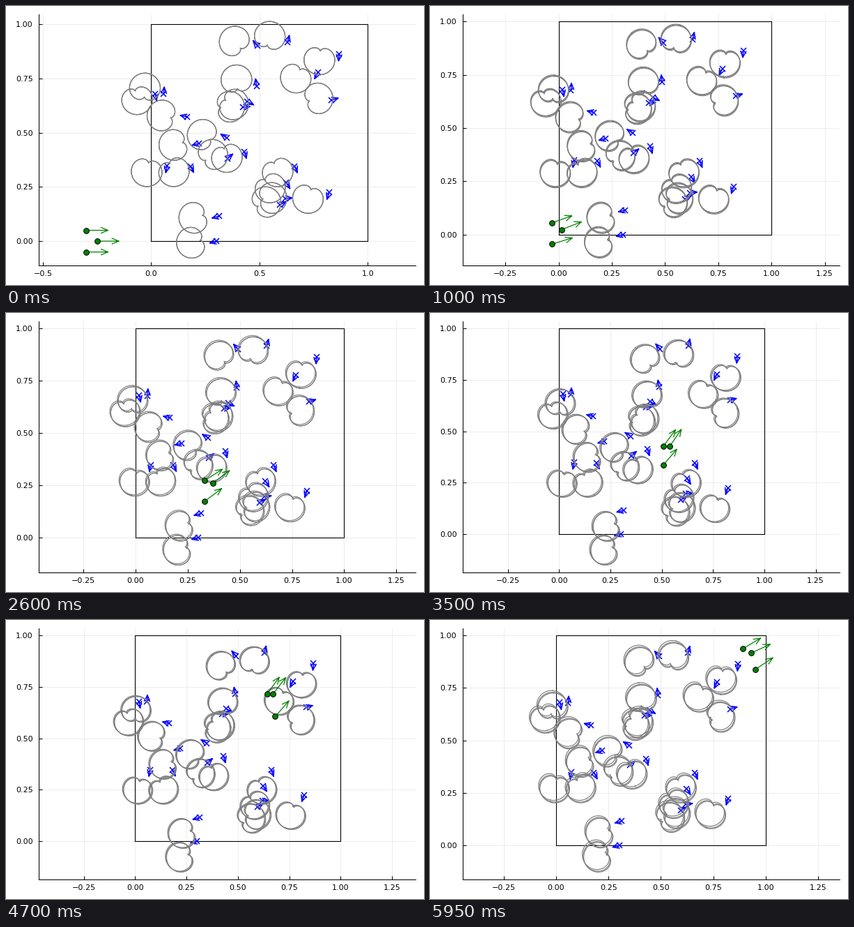
Recreate the animation shown at these times as a matplotlib script. Size 600 by 400 pixels, loop 6000 ms.

```python
import numpy as np
import matplotlib.pyplot as plt
from matplotlib.animation import FuncAnimation

FRAMES, INTERVAL = 120, 50
W, H = 600, 400
LEFT, RIGHT, TOP, BOTTOM = 46.5, 588, 12, 371.6
SPEED, STEP = 0.1, 0.01333     # arrow length, distance per frame
SIZE, BACK = 0.0547, 0.0125    # cardioid scale, cusp offset behind the obstacle
REACH = 0.89                   # how far the agent velocity shifts a cardioid

# obstacles in groups; headings fan evenly between two angles
FANS = {
    (-116, -95): [.769+.778j, .822+.224j, .074+.348j, .868+.864j],
    (-78, -58): [.018+.680j, .430+.413j, .662+.346j, .181+.346j, .623+.270j],
    (-28, 6): [.444+.644j, .423+.617j],
    (6, 39): [.618+.196j, .832+.650j, .594+.167j, .351+.381j],
    (75, 97): [.629+.917j, .058+.678j, .486+.716j],
    (131, 165): [.492+.900j, .349+.476j, .166+.572j],
    (195, 195): [.221+.451j, .313+.115j, .302],
}

# agent waypoints, all setting out to the right
KEYS = np.array([0, 20, 34, 70, 94, 119])
PATHS = np.array([
    [-.3+.05j, -.033+.055j, .126+.152j, .507+.426j, .642+.716j, .889+.936j],
    [-.25, .013+.023j, .172+.124j, .538+.426j, .671+.716j, .930+.916j],
    [-.3-.05j, -.032-.045j, .132+.042j, .508+.336j, .682+.606j, .950+.838j],
])
SLOPES = np.gradient(PATHS, KEYS, axis=1, edge_order=2)
SLOPES[:, 0] = 1
SLOPES *= STEP / abs(SLOPES)


def turn(deg):
    return np.exp(1j * np.radians(deg))


def xy(z):
    return z.real, z.imag


def agents(i):
    """Positions and velocities from a cubic Hermite through the waypoints."""
    k = min(np.searchsorted(KEYS, i, side="right") - 1, len(KEYS) - 2)
    span = KEYS[k + 1] - KEYS[k]
    u = (i - KEYS[k]) / span
    p, q = PATHS[:, k], PATHS[:, k + 1]
    m, n = SLOPES[:, k] * span, SLOPES[:, k + 1] * span
    pos = ((2*u**3 - 3*u**2 + 1) * p + (u**3 - 2*u**2 + u) * m
           + (3*u**2 - 2*u**3) * q + (u**3 - u**2) * n)
    d = (6*u**2 - 6*u) * (p - q) + (3*u**2 - 4*u + 1) * m + (3*u**2 - 2*u) * n
    return pos, SPEED * d / abs(d)


def broken(*columns):
    """One line with a gap after each row of points."""
    rows = np.column_stack(columns)
    return np.column_stack([rows, np.full(len(rows), np.nan)]).ravel()


def arrows(start, vec, length, half):
    tip, d = start + vec, vec / abs(vec)
    wing = -length * d
    side = 1j * half * d
    return np.concatenate([broken(start, tip),
                           broken(tip + wing + side, tip, tip + wing - side)])


SPOTS = np.concatenate(list(FANS.values()))
HEADS = turn(np.concatenate([np.linspace(*fan, len(p)) for fan, p in FANS.items()]))
DRIFT = 0.032 * HEADS

phi = np.linspace(0, 2 * np.pi, 121)
heart = SIZE * (1 + np.cos(phi)) * np.exp(1j * phi) - BACK
CARDS = broken(SPOTS[:, None] + HEADS[:, None] * heart)

plt.rcParams["font.family"] = "DejaVu Sans"
fig = plt.figure(figsize=(W / 100, H / 100), dpi=100, facecolor="white")
ax = fig.add_axes([LEFT / W, 1 - BOTTOM / H, (RIGHT - LEFT) / W, (BOTTOM - TOP) / H])
ax.set_axisbelow(True)
ax.grid(color="black", alpha=0.1, lw=0.5)
ax.spines[["top", "right"]].set_visible(False)
ax.spines[["left", "bottom"]].set_linewidth(0.75)
ax.tick_params(direction="in", length=3.4, width=0.75, labelsize=8)
ax.tick_params(axis="x", pad=5)
ax.tick_params(axis="y", pad=5.6)

ax.plot([0, 1, 1, 0, 0], [0, 0, 1, 1, 0], color="black", lw=0.8)
ax.plot(*xy(SPOTS), "x", color="blue", ms=6, mew=1.1)
blue, = ax.plot([], [], color="blue", lw=1.1)
rings = [ax.plot([], [], color="gray", lw=0.85)[0] for _ in PATHS]
green, = ax.plot([], [], color="green", lw=0.9)
dots, = ax.plot([], [], "o", color="green", ms=5.6, mec="black", mew=0.7)


def set_ticks(axis, lo, hi, step):
    marks = range(int(np.ceil(lo / step)), int(np.floor(hi / step)) + 1)
    digits = 1 if step == 0.5 else 2
    axis.set_ticks([n * step for n in marks],
                   [f"{n * step:.{digits}f}".replace("-", "\u2212") for n in marks])


def draw(i):
    pos, vel = agents(i)
    clouds = [CARDS - REACH * v for v in vel]
    pts = np.concatenate(clouds + [pos, pos + vel, SPOTS + DRIFT, [0, 1 + 1j]])
    lo, hi = (np.array(xy(pts)) for _ in range(2))
    lo, hi = np.nanmin(lo, axis=1), np.nanmax(hi, axis=1)
    mid, span = (lo + hi) / 2, 1.06 * (hi[1] - lo[1])
    px = span / (BOTTOM - TOP)
    half = np.array([px * (RIGHT - LEFT), span]) / 2
    (x0, y0), (x1, y1) = mid - half, mid + half
    ax.set_xlim(x0, x1)
    ax.set_ylim(y0, y1)
    set_ticks(ax.xaxis, x0, x1, 0.5 if x0 <= -0.5 else 0.25)
    set_ticks(ax.yaxis, y0, y1, 0.25)

    blue.set_data(*xy(arrows(SPOTS, DRIFT, 8.5 * px, 3.8 * px)))
    for ring, cloud in zip(rings, clouds):
        ring.set_data(*xy(cloud))
    green.set_data(*xy(arrows(pos, vel, 9.5 * px, 4 * px)))
    dots.set_data(*xy(pos))
    return [blue, *rings, green, dots]


anim = FuncAnimation(fig, draw, frames=FRAMES, interval=INTERVAL, repeat=True,
                     repeat_delay=0, blit=False)
plt.show()
```
